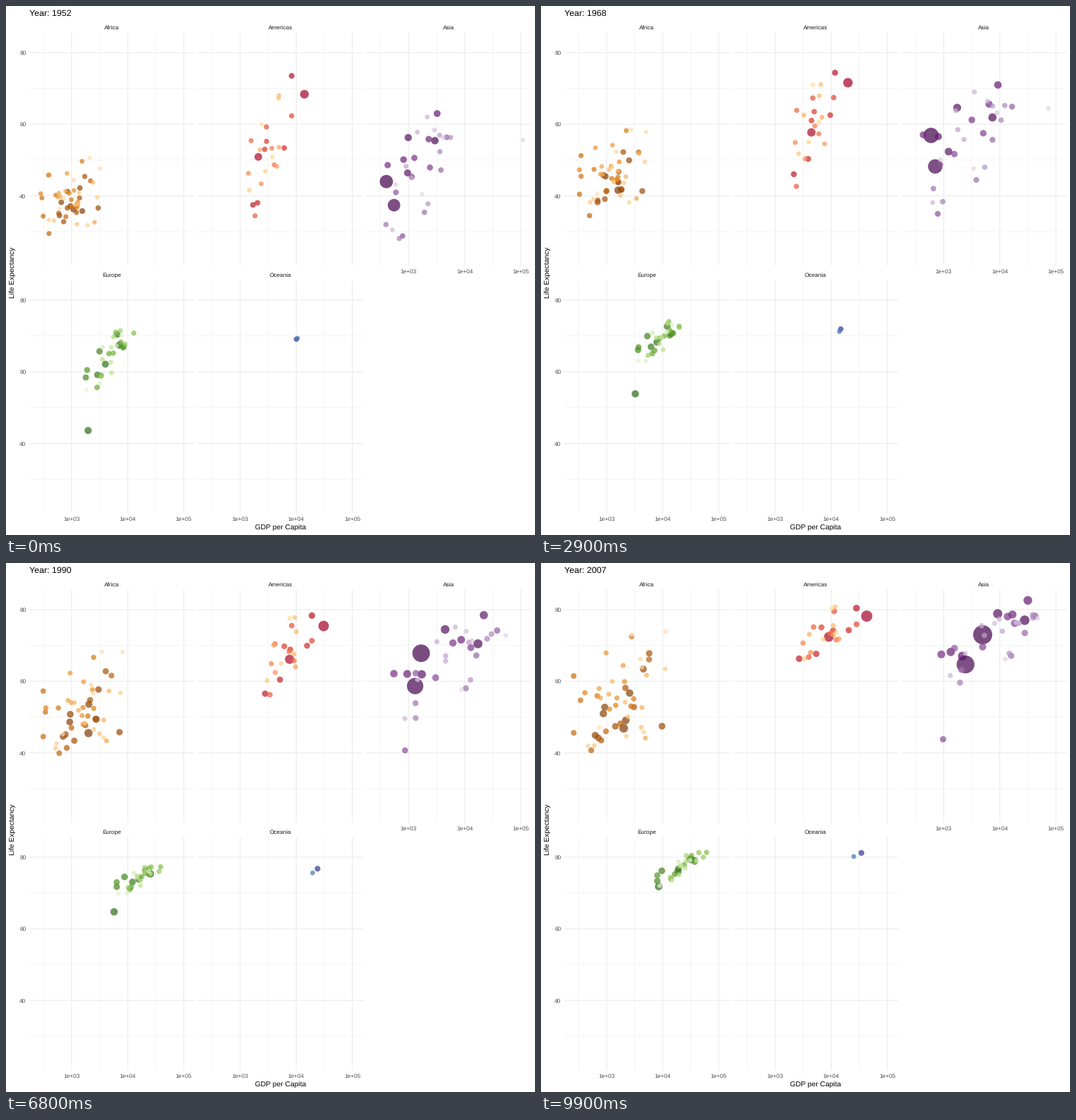
These frames come from a looping animation (748 by 748 pixels, 10000 ms). A matplotlib script:

```python
import matplotlib.pyplot as plt
import numpy as np
from matplotlib.animation import FuncAnimation
from matplotlib.colors import LinearSegmentedColormap

SIDE, DPI, FRAMES = 748, 64, 100
PT = 72 / DPI
DECADE, YEAR_PX = 79.3, 5.0625      # pixels per power of ten / per year of life
PANEL_W, PANEL_H = 233, 328.6
KEYS = 1952, 1977, 2007
STOPS = np.arange(1952, 2008, 5)    # the dots turn every five years
YEARS = np.linspace(KEYS[0], KEYS[-1], FRAMES)

# column, row, dots, colour ramp from the largest population to the smallest
PANELS = {
    "Africa": (0, 0, 52, ["#7F3B08", "#B35806", "#E08214", "#FDB863", "#FEE0B6"]),
    "Americas": (1, 0, 25, ["#A50026", "#D73027", "#F46D43", "#FDAE61", "#FEE090"]),
    "Asia": (2, 0, 33, ["#40004B", "#762A83", "#9970AB", "#C2A5CF", "#E7D4E8"]),
    "Europe": (0, 1, 30, ["#276419", "#4D9221", "#7FBC41", "#B8E186", "#E6F5D0"]),
    "Oceania": (1, 1, 2, ["#313695", "#4575B4"]),
}

# largest population in millions, ranks per e-fold, share already there in 1952
PEOPLE = {
    "Africa": (80, 12, .26),
    "Americas": (55, 8, .42),
    "Asia": (230, 8, .38),
    "Europe": (85, 7, .8),
    "Oceania": (20, .7, .45),
}

# cloud at each key year: mean and spread of log income, of life, correlation
CLOUDS = {
    "Africa": [(2.98, .28, 39.1, 5.2, .35), (3.18, .33, 49.6, 6.5, .5), (3.23, .43, 54.8, 9.6, .5)],
    "Americas": [(3.50, .22, 53, 8.8, .55), (3.77, .20, 64.3, 6.7, .5), (3.92, .28, 73.5, 4, .6)],
    "Asia": [(3.14, .33, 46.8, 9, .6), (3.52, .50, 59.8, 9, .65), (3.82, .50, 71.2, 6, .75)],
    "Europe": [(3.69, .23, 65, 5, .8), (4.11, .20, 72.2, 2, .7), (4.36, .24, 77.7, 2.6, .85)],
}

# dots that stand apart: (panel, rank): population, income and life at the key years
LEADS = {
    ("Africa", 0): (135, (1077, 1982, 2014), (36.3, 44.5, 46.9)),
    ("Americas", 0): (301, (13990, 24073, 42952), (68.4, 73.4, 78.2)),
    ("Americas", 1): (190, (2109, 6660, 9066), (50.9, 61.5, 72.4)),
    ("Asia", 0): (1319, (400, 741, 4959), (44, 64, 73)),
    ("Asia", 1): (1110, (547, 813, 2452), (37.4, 54.2, 64.7)),
    ("Asia", 5): (127, (3217, 16610, 31656), (63, 75.4, 82.6)),
    ("Asia", 12): (32, (779, 786, 975), (28.8, 38.4, 43.8)),
    ("Asia", 31): (2, (108382, 59265, 47307), (55.6, 69.3, 77.6)),
    ("Europe", 0): (82, (7144, 20513, 32170), (67.5, 72.5, 79.4)),
    ("Europe", 1): (71, (1969, 4269, 8458), (43.6, 59.5, 71.8)),
    ("Oceania", 0): (20, (10040, 18334, 34435), (69.1, 73.5, 81.2)),
    ("Oceania", 1): (4, (10557, 16234, 25185), (69.4, 72.2, 80.2)),
}

rng = np.random.default_rng(7)


def px(log_gdp, col):
    return 92.8 + 238.3 * col + DECADE * (log_gdp - 3)


def py(life, row):
    return 66 + 350 * row + YEAR_PX * (80 - life)


def diameter(pop):
    size = 2 + 10 * np.sqrt(np.clip(pop / 1319, 0, 1))
    return .75 * (2.845 * size + .94) + .7


def drift(count):
    """Standard scores that wander slowly, one row per stop."""
    walk = rng.normal(size=count) + np.cumsum(rng.normal(0, .12, (len(STOPS), count)), axis=0)
    walk -= walk.mean(axis=1, keepdims=True)
    return np.clip(walk / walk.std(axis=1, keepdims=True), -1.9, 1.9)


def cloud(name, count):
    """Log income and life of every dot, by frame."""
    rich, other = drift(count), drift(count)
    shape = [np.interp(STOPS, KEYS, v)[:, None] for v in zip(*CLOUDS[name])]
    gdp_mid, gdp_dev, life_mid, life_dev, r = shape
    gdp = gdp_mid + gdp_dev * rich
    life = life_mid + life_dev * (r * rich + np.sqrt(1 - r * r) * other)
    return [np.array([np.interp(YEARS, STOPS, dot) for dot in v.T]) for v in (gdp, life)]


xs, ys, areas, colors = [], [], [], []
for name, (col, row, count, ramp) in PANELS.items():
    top, fade, start = PEOPLE[name]
    pops = top * np.exp(-np.arange(count) / fade)
    gdp, life = cloud(name, count) if name in CLOUDS else np.zeros((2, count, FRAMES))
    for (panel, rank), (pop, g, l) in LEADS.items():
        if panel == name:
            pops[rank] = pop
            gdp[rank] = np.interp(YEARS, KEYS, np.log10(g))
            life[rank] = np.interp(YEARS, KEYS, l)
    share = np.interp(YEARS, [KEYS[0], KEYS[-1]], [start, 1])
    xs.append(px(gdp, col))
    ys.append(py(life, row))
    areas.append((diameter(np.outer(pops, share)) * PT) ** 2)
    colors.extend(LinearSegmentedColormap.from_list(name, ramp)(np.linspace(0, 1, count)))
spots = np.stack([np.vstack(xs).T, np.vstack(ys).T], axis=-1)
areas = np.vstack(areas).T

plt.rcParams.update({"font.family": "Liberation Sans", "text.hinting": "none"})
fig = plt.figure(figsize=(SIDE / DPI, SIDE / DPI), dpi=DPI, facecolor="white")
ax = fig.add_axes([0, 0, 1, 1])
ax.set(xlim=(0, SIDE), ylim=(SIDE, 0))
ax.axis("off")


def label(x, y, text, size, color="black", **kw):
    return ax.text(x, y, text, fontsize=size * PT, color=color, **kw)


def grid(x, y, major):
    ax.plot(x, y, color="#EBEBEB", lw=(1.07 if major else .53) * PT, zorder=1, snap=False)


for name, (col, row, _, _) in PANELS.items():
    x0, y0 = 33.2 + 238.3 * col, 38 + 350 * row
    for life in range(30, 81, 10):
        y, major = py(life, row), life % 20 == 0
        grid([x0, x0 + PANEL_W], [y, y], major)
        if major and col == 0:
            label(28.5, y + 3, str(life), 8.2, "#4D4D4D", ha="right")
    for power in np.arange(2.5, 5.1, .5):
        x, major = px(power, col), power % 1 == 0
        grid([x, x], [y0, y0 + PANEL_H], major)
        if major and (row == 1 or col == 2):
            label(x, y0 + 339.5, f"1e+{power:02.0f}", 8.2, "#4D4D4D", ha="center")
    label(x0 + PANEL_W / 2, y0 - 5, name, 8.2, "#1A1A1A", ha="center")

label(388, 739.5, "GDP per Capita", 10.3, ha="center")
label(9.5, 377, "Life Expectancy", 10.3, ha="center", va="center", rotation=90)
title = label(33, 14, "Year: 1952", 12.4)
dots = ax.scatter(*spots[0].T, s=areas[0], c=colors, alpha=.7, linewidths=0, zorder=3)


def update(i):
    dots.set_offsets(spots[i])
    dots.set_sizes(areas[i])
    title.set_text(f"Year: {YEARS[i]:.0f}")
    return dots, title


anim = FuncAnimation(fig, update, frames=FRAMES, interval=100, repeat=True)
plt.show()
```
